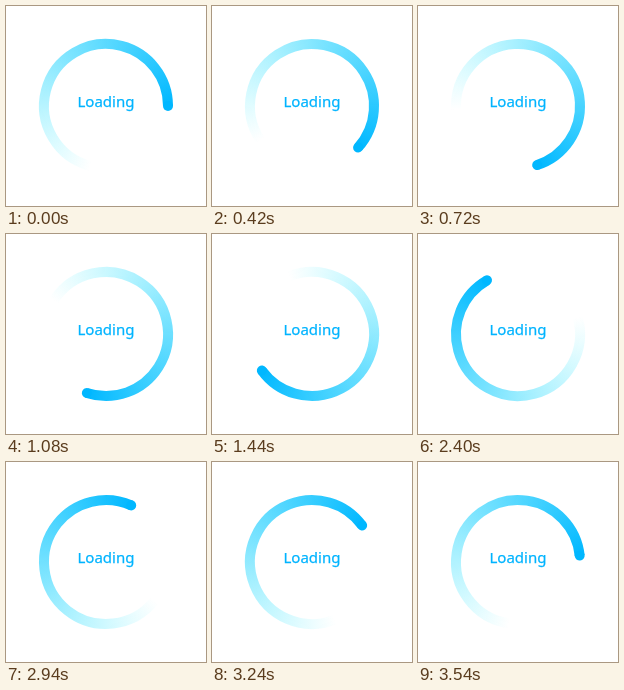
Animation of 200x200 px, one loop 3600 ms. Source, as an HTML page with a canvas:

```html
<!DOCTYPE html>
<html lang="en">
<head>
<meta charset="utf-8">
<title>Loading</title>
<style>
  html, body { margin: 0; width: 100%; height: 100%; overflow: hidden; background: #fff; }
  svg, canvas { position: absolute; left: 0; top: 0; }
  text { font: 500 15px "Noto Sans", "Open Sans", sans-serif; fill: #00b4ff; stroke: #00b4ff; stroke-width: 0.25px; }
</style>
</head>
<body>
<canvas id="ring" width="200" height="200"></canvas>
<svg width="200" height="200"><text x="71.5" y="101">Loading</text></svg>
<script>
const LOOP = 3600, STEP = 60, RADIUS = 62, WIDTH = 10;
const TAU = 2 * Math.PI;
const TAIL = 0.29 * TAU;
const HEAD_COLOR = "#00b7ff";
const ctx = document.getElementById("ring").getContext("2d");

// The arc fades in from the tail to the head at angle 0.
// The gradient's seam lies in the open gap, away from both ends.
const fade = ctx.createConicGradient(TAU / 8, 0, 0);
fade.addColorStop(0.165, "rgba(40, 238, 255, 0)");
fade.addColorStop(0.52, "rgba(10, 205, 255, 0.52)");
fade.addColorStop(0.875, HEAD_COLOR);

function draw(time) {
  const step = Math.floor((time % LOOP) / STEP);
  ctx.setTransform(1, 0, 0, 1, 100, 100);
  ctx.clearRect(-100, -100, 200, 200);
  ctx.rotate(step * STEP / LOOP * TAU);

  ctx.lineWidth = WIDTH;
  ctx.strokeStyle = fade;
  ctx.beginPath();
  ctx.arc(0, 0, RADIUS, TAIL, TAU);
  ctx.stroke();

  ctx.fillStyle = HEAD_COLOR;
  ctx.beginPath();
  ctx.arc(RADIUS, 0, WIDTH / 2, 0, TAU);
  ctx.fill();
}

const start = performance.now();
function tick() {
  draw(performance.now() - start);
  requestAnimationFrame(tick);
}
tick();
</script>
</body>
</html>
```
